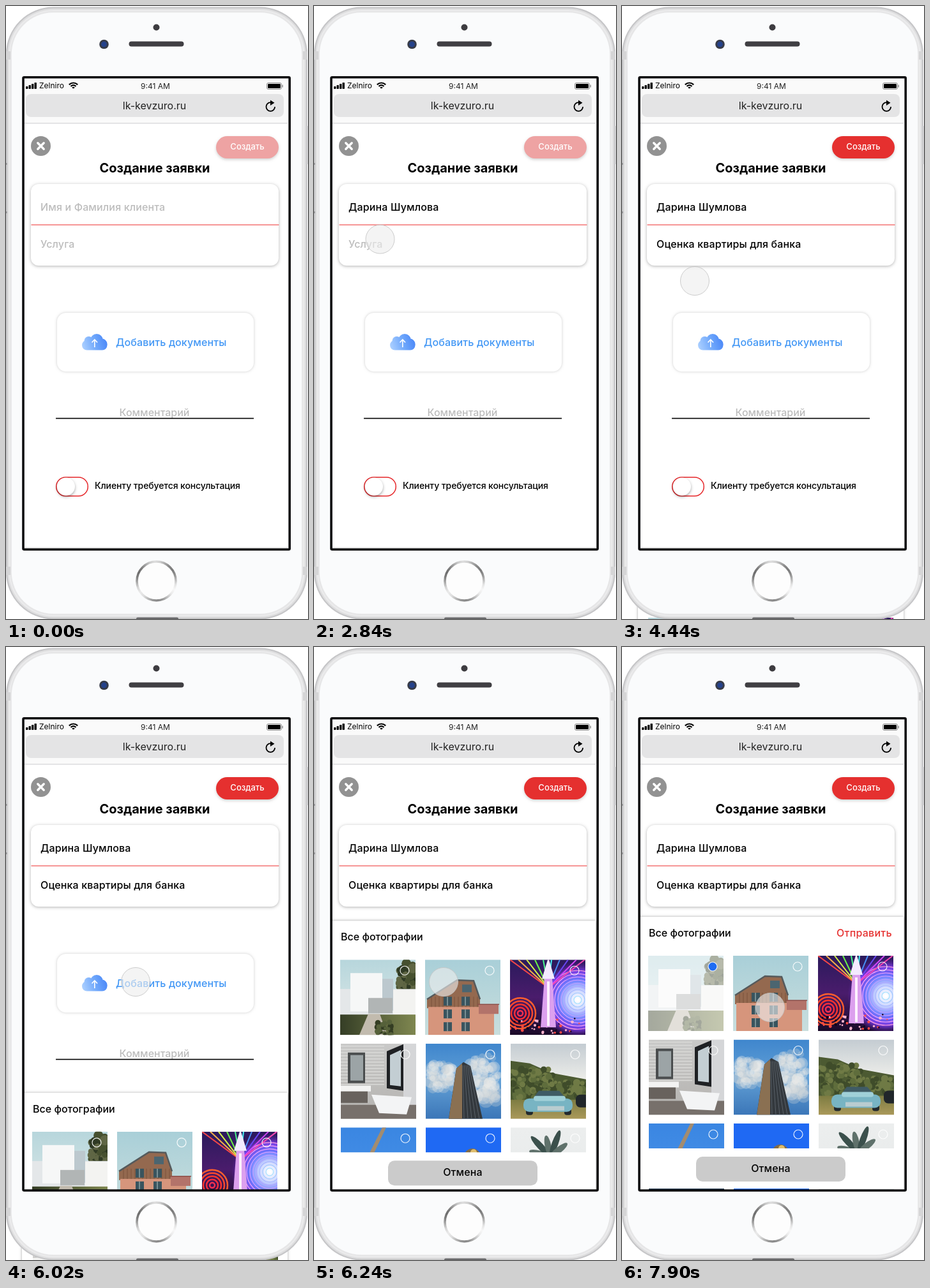
Write an HTML page with a canvas that moves like this. It is 473 px wide and 961 px high and loops after 8000 ms.

```html
<!DOCTYPE html>
<html lang="ru">
<head>
<meta charset="utf-8">
<title>Создание заявки</title>
<style>
html, body { margin: 0; width: 100%; height: 100%; overflow: hidden; background: #fff; }
canvas { display: block; width: 473px; height: 961px; }
</style>
</head>
<body>
<canvas id="stage"></canvas>
<script>
const W = 473, H = 961, LOOP = 8000;
const RED = '#e5302f', GREY = '#bcbcbc';
const cv = document.getElementById('stage');
const dpr = window.devicePixelRatio || 1;
cv.width = W * dpr;
cv.height = H * dpr;
const c = cv.getContext('2d');

const clamp = v => Math.max(0, Math.min(1, v));
const prog = (t, a, b) => clamp((t - a) / (b - a));
const lerp = (a, b, p) => a + (b - a) * p;
const ease = u => u < 0.5 ? 4 * u ** 3 : 1 - 4 * (1 - u) ** 3;

function random(seed) {
  return () => (seed = seed * 16807 % 2147483647) / 2147483647;
}
function paint(fill, stroke, lw = 1) {
  if (fill) { c.fillStyle = fill; c.fill(); }
  if (stroke) { c.strokeStyle = stroke; c.lineWidth = lw; c.stroke(); }
}
function rect(x, y, w, h, col) {
  c.fillStyle = col;
  c.fillRect(x, y, w, h);
}
function rr(x, y, w, h, r, fill, stroke, lw) {
  c.beginPath();
  c.roundRect(x, y, w, h, r);
  paint(fill, stroke, lw);
}
function disc(x, y, r, fill, stroke, lw) {
  c.beginPath();
  c.arc(x, y, r, 0, 7);
  paint(fill, stroke, lw);
}
function trace(pts) {
  c.beginPath();
  for (let i = 0; i < pts.length; i += 2) c.lineTo(pts[i], pts[i + 1]);
}
function poly(pts, fill) {
  trace(pts);
  c.closePath();
  paint(fill);
}
function line(pts, col, lw) {
  trace(pts);
  paint(null, col, lw);
}
function text(s, x, y, col, size = 16, weight = 500, align = 'left', gap = 0.15) {
  c.font = `${weight} ${size}px Inter, "Open Sans", sans-serif`;
  c.letterSpacing = gap + 'px';
  c.textAlign = align;
  c.fillStyle = col;
  c.fillText(s, x, y);
}
function shade(col, blur, dy, draw) {
  c.save();
  c.shadowColor = col;
  c.shadowBlur = blur * dpr;
  c.shadowOffsetY = dy * dpr;
  draw();
  c.restore();
}
function grad(x1, y1, x2, y2, ...cols) {
  const g = c.createLinearGradient(x1, y1, x2, y2);
  cols.forEach((k, i) => g.addColorStop(i / (cols.length - 1), k));
  return g;
}

// Small scenes, each S px square
const S = 118;
const fill = (...cols) => rect(0, 0, S, S, grad(0, 0, 0, S, ...cols));

// Scatter n soft spots inside a box
function spots(seed, n, x, y, w, h, r, cols) {
  const rnd = random(seed);
  for (let i = 0; i < n; i++)
    disc(x + rnd() * w, y + rnd() * h, r * (0.4 + rnd() * 0.6), cols[i % cols.length]);
}
function leaf(angle, len, col) {
  c.save();
  c.translate(62, 46);
  c.rotate(angle);
  c.beginPath();
  c.ellipse(0, -len / 2, 5, len / 2, 0, 0, 7);
  paint(col);
  c.restore();
}

const scenes = [
  function villa() {
    fill('#b7d6dc', '#e2ebe9');
    spots(7, 45, 92, 6, 24, 40, 8, ['#46502f', '#2f3a24', '#5f6644']);
    rect(0, 46, S, 42, '#e4e7e9');
    rect(16, 21, 50, 60, '#f6f7f7');
    rect(66, 30, 17, 50, '#bcc8ce');
    rect(83, 47, 35, 40, '#f3f3f1');
    rect(44, 60, 38, 24, '#b1b5b5');
    rect(0, 86, S, 32, grad(0, 0, S, 0, '#353e26', '#7f8750'));
    poly([44, 85, 62, 85, 74, S, 30, S], '#c2bbae');
    spots(11, 30, 58, 98, 22, 20, 5, ['#343d23', '#56613a']);
  },
  function gable() {
    fill('#a9cfd8', '#c9dedd');
    poly([3, 62, 50, 32, 76, 33, 86, 60, 86, 76, 3, 76], '#94694f');
    rect(5, 74, 103, 44, '#d6957c');
    for (let x = 10; x < 84; x += 6) line([x, 58, x, 74], '#7a523c', 1);
    line([3, 62, 50, 32, 76, 33, 86, 62], '#555a5c', 2.5);
    for (let i = 0; i < 6; i++) {
      const x = 29 + i % 2 * 28, y = 58 + (i >> 1) * 20;
      rect(x, y, 13, 14, '#39545e');
      line([x + 6, y, x + 6, y + 14], '#b9c9c9', 1);
    }
    rect(58, 39, 15, 12, '#4b6570');
    rect(84, 70, 31, 15, '#b3736a');
    line([82, 70, 116, 70], '#8b4e48', 1.5);
  },
  function fair() {
    fill('#2b1a5c', '#4a1c6c', '#1a0a28');
    const g = c.createRadialGradient(106, 63, 2, 106, 63, 60);
    ['#fff', '#c9d4ff', '#6d7bff', '#7a3ce0', 'rgba(80,30,150,0)'].forEach((k, i) => g.addColorStop(i / 4, k));
    rect(30, 0, 88, S, g);
    for (let i = 0; i < 9; i++) disc(106, 63, 6 + i * 5, null, `hsl(${200 + i * 15} 100% 82%)`, 1.2);
    for (let i = 0; i < 10; i++) line([i * 13, 0, 60, 44], `hsl(${i * 36} 90% 62%)`, 2);
    for (let i = 0; i < 5; i++) disc(16, 84, 4 + i * 5, null, `hsl(${350 + i * 6} 95% 58%)`, 2.5);
    spots(5, 40, 0, 92, S, 24, 2.5, ['#ff4a45', '#ffb4ce', '#12061c']);
    poly([54, 28, 66, 28, 72, 106, 48, 106], '#dca0ee');
    poly([59, 0, 61, 0, 70, 30, 50, 30], '#f3eaff');
    line([60, 34, 60, 104], '#fff2ff', 4);
  },
  function bath() {
    fill('#c9c9c8', '#b4b2af');
    for (let y = 4; y < 66; y += 5) line([0, y, 68, y], '#dadad8', 1.5);
    rect(11, 14, 27, 48, '#4a4d4e');
    rect(15, 18, 20, 40, '#9ca4a6');
    poly([72, 12, 98, 1, 98, 74, 72, 70], '#1f2124');
    poly([77, 18, 94, 10, 94, 67, 77, 65], '#c3ced3');
    rect(98, 0, 20, 100, '#d5d6d8');
    rect(0, 96, S, 22, '#77706b');
    rect(0, 66, 47, 9, '#f3f3f2');
    rect(0, 75, 42, 18, '#68625d');
    poly([48, 80, 111, 84, 103, 111, 60, 109], '#f3f4f5');
  },
  function tower() {
    fill('#3f86cd', '#62a0d6', '#3b76b8');
    const puff = ['rgba(235,236,232,.35)', 'rgba(205,212,214,.3)'];
    spots(3, 60, 4, 30, 40, 40, 10, puff);
    spots(9, 80, 70, 20, 46, 70, 11, puff);
    poly([36, S, 48, 39, 59, 29, 70, 35, 89, S], '#33383d');
    poly([36, S, 48, 39, 57, 31, 57, S], '#8a7052');
    for (let i = 0; i < 5; i++) line([58 + i * 2.5, 34, 60 + i * 6, S], '#596067', 1);
  },
  function meadow() {
    fill('#c4ccd2', '#eeeeea', '#eeeeea');
    poly([0, 27, 30, 31, 64, 46, S, 56, S, 92, 0, 92], '#4c5a32');
    spots(4, 110, 0, 40, 66, 44, 6, ['#5f6d3c', '#3f4c2a', '#6f7a45']);
    spots(6, 60, 60, 60, 58, 24, 6, ['#5f6d3c', '#3f4c2a', '#6f7a45']);
    rect(0, 88, S, 30, grad(0, 88, 0, S, '#7d7c42', '#aa995a'));
    rr(102, 80, 24, 20, 7, '#20262a');
    for (const x of [24, 84]) rr(x, 97, 11, 15, 4, '#22292d');
    poly([32, 90, 44, 74, 76, 74, 90, 90], '#3f5b65');
    rr(20, 86, 77, 21, 9, '#78b4c3');
    rr(36, 82, 50, 8, 4, '#a0d0d8');
    rect(42, 98, 42, 7, '#b9ccd0');
  },
  function crane() {
    fill('#3a86e2', '#4b94e9');
    poly([65, 0, 71, 0, 52, 40, 45, 40], '#a28c70');
    rect(0, 102, S, 16, '#23384f');
  },
  function dome() {
    fill('#1f69f3', '#1f69f3');
    disc(73, 46, 13, '#806b48');
    disc(75, 39, 5, '#dfbd6c');
  },
  function leaves() {
    fill('#eceeee', '#e6e9e9');
    for (let i = 0; i < 5; i++) leaf(-1.3 + i * 0.55, 34 + i % 2 * 10, i % 2 ? '#3b504c' : '#5f716b');
  }
];

function photo(i, top, sel) {
  const col = i % 3, row = Math.floor(i / 3);
  c.save();
  c.translate(41 + col * 133 + (row ? 1 : 0), top + 62 + row * 131.5);
  c.beginPath();
  c.rect(0, 0, S, S);
  c.clip();
  scenes[i]();
  rect(0, 0, S, S, `rgba(255,255,255,${0.55 * sel})`);
  disc(101, 17, 7, `rgba(31,108,242,${sel})`, 'rgba(255,255,255,.9)', 1.2);
  c.restore();
}

function sheet(t) {
  const show = prog(t, 3990, 4440);
  if (!show) return;
  const top = lerp(897, 422, ease(prog(t, 5748, 6327)));
  const sel = prog(t, 7050, 7380);
  c.save();
  c.globalAlpha = show;
  shade('rgba(0,0,0,.35)', 4, 0, () => rect(25, top + 1, 416, 443, '#fff'));
  text('Все фотографии', 42, top + 32, '#000', 16, 500, 'left', 0);
  for (let i = 0; i < 9; i++) photo(i, top, i ? 0 : sel);
  rect(26, top + 364, 414, 63, '#fff');
  rr(116, top + 377, 234, 39, 10, '#cbcbcb');
  text('Отмена', 233, top + 401, '#000', 16, 500, 'center');
  c.globalAlpha = sel;
  text('Отправить', 336, top + 32, RED, 16, 500, 'left', 0.25);
  c.restore();
}

function header() {
  rect(27, 112, 416, 72, '#fafafa');
  rect(29, 183, 412, 1.5, '#dcdcdd');
  for (let i = 0; i < 4; i++) rr(31 + i * 4.5, 126 - i * 2, 3.4, 4 + i * 2, 0.8, '#000');
  text('Zelniro', 52, 129, '#000', 12, 400, 'left', 0);
  text('9:41 AM', 234, 130, '#222', 12, 400, 'center', 0);
  c.save();
  poly([105.5, 130, 93, 117.5, 118, 117.5]);
  c.clip();
  for (let i = 0; i < 3; i++) disc(105.5, 129.5, 1.6 + i * 3.7, null, '#000', 2.2);
  c.restore();
  rr(408.5, 120.5, 23, 10, 2.5, '#fff', '#888', 1);
  rr(410, 122, 20, 7, 1.3, '#000');
  rr(432.5, 123.5, 1.3, 4, 0.6, '#888');
  rr(31, 138, 404, 36, 8, '#e4e4e5');
  text('lk-kevzuro.ru', 232.5, 162, '#222', 16, 400, 'center', 0);
  c.beginPath();
  c.arc(414.3, 158, 6.8, 0, Math.PI * 1.55);
  paint(null, '#000', 1.8);
  poly([414, 147.5, 420.5, 151.8, 414, 156], '#000');
}

function cloud() {
  const g = grad(119, 530, 158, 518, '#a9ceff', '#70a8fb', '#4785f8');
  rr(119, 524, 39.5, 15.5, 7.7, g);
  disc(129.5, 525, 7, g);
  disc(142, 524, 10, g);
  disc(150, 530, 8.5, g);
  line([138.8, 523.5, 138.8, 535], '#fff', 1.6);
  line([134.5, 527.5, 138.8, 523, 143.1, 527.5], '#fff', 1.6);
}

function page(t) {
  rect(25, 110, 420, 744, '#fff');
  header();
  disc(54.5, 219.5, 15.5, '#929292');
  c.lineCap = 'round';
  for (const d of [-4.7, 4.7]) line([54.5 - d, 214.8, 54.5 + d, 224.2], '#fff', 3.4);
  c.lineCap = 'butt';

  const on = prog(t, 3990, 4440);
  const tint = `rgb(${lerp(238, 229, on)},${lerp(163, 48, on)},${lerp(163, 47, on)})`;
  shade('rgba(0,0,0,.18)', 4, 2, () => rr(329, 204, 98, 35, 17.5, tint));
  text('Создать', 378, 225, '#fff', 13, 500, 'center', 0);
  text('Создание заявки', 233, 261, '#000', 20, 700, 'center', 0);

  shade('rgba(0,0,0,.3)', 5, 1, () => rr(39, 279, 388, 128, 12, '#fff'));
  rect(39.5, 342.3, 388, 1.6, '#f47c7c');
  if (t < 1860) text('Имя и Фамилия клиента', 54, 321, GREY);
  else if (t >= 1960) text('Дарина Шумлова', 54, 321, '#000');
  if (t < 3100) text('Услуга', 54, 379, GREY);
  else if (t >= 3200) text('Оценка квартиры для банка', 54, 379, '#000');

  shade('rgba(0,0,0,.2)', 4, 0, () => rr(80, 481, 308, 92, 14, '#fff'));
  cloud();
  text('Добавить документы', 172, 533, '#4096f5');
  text('Комментарий', 232.5, 643, GREY, 16, 500, 'center', 0);
  rect(78, 645.7, 310, 1.6, '#000');

  rr(78.7, 738.7, 49.6, 29.6, 14.8, '#fff', '#e62629', 1.5);
  shade('rgba(0,0,0,.35)', 4, 2, () => disc(94, 753.5, 14, '#fff'));
  text('Клиенту требуется консультация', 139, 757, '#000', 14, 500, 'left', -0.1);
  rect(29, 848.5, 412, 1.5, '#e2e2e2');
}

function phone() {
  // Nested rims around the screen opening
  ['#c6c6c8', '#dededf', '#ebebec', '#e6e6e7', '#fafbfc'].forEach((col, i) => {
    const d = i * 2.2;
    c.beginPath();
    c.roundRect(d, 1.5 + d, 472 - 2 * d, 960 - 2 * d, 74 - d);
    c.rect(27, 112, 417, 740);
    c.fillStyle = col;
    c.fill('evenodd');
  });
  for (const y of [71, 879])
    for (const x of [0, 465]) rect(x, y, 7, 13, '#d5d5d6');
  for (const y of [246, 322]) rect(0, y, 1.5, 3, '#8f8f91');
  rect(471, 188, 2, 60, '#d2d2d4');

  disc(235.5, 33.5, 5, '#3d3c40');
  disc(153.5, 60, 7.3, '#373b48');
  disc(153.5, 60, 4.4, '#25428b');
  rr(192.5, 55.5, 86, 8, 4, '#403f43');
  rr(27, 111.8, 417.2, 740.2, 1.5, null, '#0c0c0e', 3.6);
  rr(204, 958.5, 66, 5, 2, '#69696b');

  const g = c.createConicGradient(-0.6, 235.5, 901.5);
  for (let i = 0; i <= 24; i++) {
    const a = i / 24 * Math.PI * 2;
    g.addColorStop(i / 24, `hsl(0 0% ${70 - 22 * Math.cos(a * 3) + 6 * Math.sin(a)}%)`);
  }
  disc(235.5, 901.5, 30.5, '#fdfdfd', g, 3.6);
}

// start, end, target x, target y
const moves = [
  [510, 870, 152, 285],
  [1130, 1560, 129, 311],
  [2310, 3050, 101, 371],
  [3220, 3830, 114, 431],
  [4960, 5800, 203, 525],
  [6520, 6710, 98, 552],
  [7420, 7910, 232, 565]
];

function cursor(t) {
  if (t < 520) return;
  let x = 371, y = 38;
  for (const [a, b, tx, ty] of moves) {
    const p = ease(prog(t, a, b));
    x = lerp(x, tx, p);
    y = lerp(y, ty, p);
  }
  const tap = prog(t, 6540, 6700) - prog(t, 7060, 7380);
  disc(x, y, 22.5, `rgba(238,238,238,${lerp(0.62, 0.25, tap)})`, 'rgba(196,196,196,.85)', 1);
}

function frame(now) {
  const t = now % LOOP;
  c.setTransform(dpr, 0, 0, dpr, 0, 0);
  rect(0, 0, W, H, '#fff');
  page(t);
  sheet(t);
  phone();
  cursor(t);
}

const start = performance.now();
function tick() {
  frame(performance.now() - start);
  requestAnimationFrame(tick);
}
tick();
</script>
</body>
</html>
```
